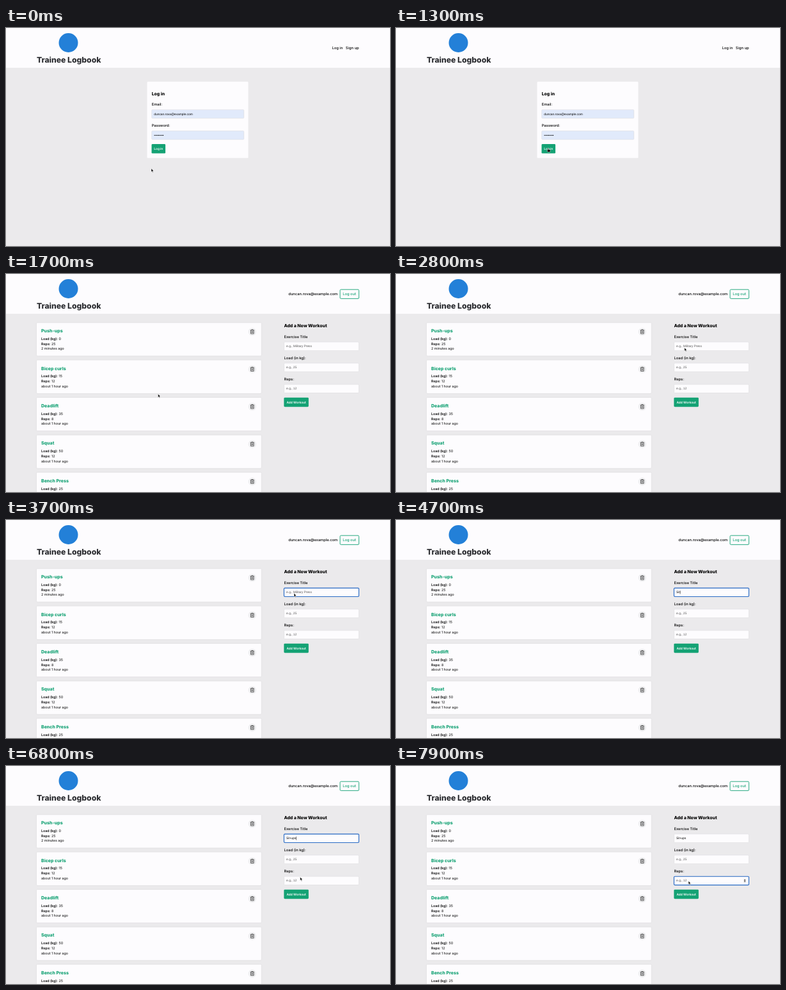
These frames come from a looping animation (600x340 px, 8 s). An HTML page:

```html
<!DOCTYPE html>
<html lang="en">
<head>
<meta charset="utf-8">
<title>Trainee Logbook</title>
<style>
  html, body { margin: 0; width: 100%; height: 100%; overflow: hidden; background: #ebeaec; }
  svg { display: block; width: 600px; height: 340px; }
  text { font-family: Inter, "Open Sans", sans-serif; font-size: 5.76px; font-weight: 500; fill: #000; text-rendering: geometricPrecision; }
  .brand { font-size: 12.2px; font-weight: 800; fill: #2c2d31; }
  .head { font-size: 6.9px; font-weight: 800; }
  .title { font-size: 7px; font-weight: 800; fill: #14a274; }
  .line { font-size: 5.3px; fill: #222; }
  .bold { font-weight: 750; }
  .btn { font-size: 4.8px; font-weight: 600; fill: #fff; }
  .field { font-family: "Liberation Sans", Arial, sans-serif; font-size: 4.85px; }
  .hint { fill: #555; }
  .green { fill: #14a274; }
  .box { fill: #fdfcfe; stroke: #d8d8da; stroke-width: .5; }
  .auto { fill: #e1eafb; }
  .ring { fill: none; stroke: #2a6cc6; stroke-width: 1.15; }
  .card { fill: #fdfcfe; filter: drop-shadow(.7px .7px .9px rgba(0, 0, 0, .07)); }
</style>
</head>
<body>
<svg id="stage" viewBox="0 0 600 340" xmlns="http://www.w3.org/2000/svg"></svg>
<script>
const LOOP = 8000, STEP = 100, BLINK = 500;
const EMAIL = "duncan.rova@example.com";
const stage = document.getElementById("stage");

function add(parent, tag, attrs, content) {
  const el = document.createElementNS("http://www.w3.org/2000/svg", tag);
  for (const key in attrs) el.setAttribute(key, attrs[key]);
  if (content !== undefined) el.textContent = content;
  return parent.appendChild(el);
}
const group = (parent = stage) => add(parent, "g", {});
const rect = (parent, x, y, width, height, attrs) =>
  add(parent, "rect", { x, y, width, height, ...attrs });
const text = (parent, x, y, content, cls = "", attrs = {}) =>
  add(parent, "text", { x, y, class: cls, ...attrs }, content);
const show = (el, on) => el.setAttribute("visibility", on ? "visible" : "hidden");

function button(parent, x, y, width, height, label) {
  rect(parent, x, y, width, height, { rx: 1.4, class: "green" });
  text(parent, x + width / 2, y + height / 2 + 1.7, label, "btn", { "text-anchor": "middle" });
}

function input(parent, x, y, width, label, hint) {
  text(parent, x, y - 6.3, label);
  rect(parent, x, y, width, 13.4, { rx: 1.3, class: "box" });
  return text(parent, x + 3.6, y + 8.2, hint, "field hint");
}

function trash(parent, x, y) {
  add(parent, "circle", { cx: x, cy: y, r: 6.1, fill: "#ededef" });
  add(parent, "path", {
    transform: `translate(${x} ${y})`,
    d: "M-2.9-2.5H2.9M-1-2.6V-3.2H1V-2.6M-2.3-2.4V3H2.3V-2.4M-.8-1.2V1.8M.8-1.2V1.8",
    fill: "none", stroke: "#333", "stroke-width": .75
  });
}

function workoutCard(parent, y, [name, load, reps, age]) {
  rect(parent, 48, y, 350.8, 51.3, { rx: 1.4, class: "card" });
  text(parent, 55, y + 15, name, "title");
  [["Load (kg):", load], ["Reps:", reps]].forEach(([label, value], i) => {
    const row = text(parent, 55, y + 26.8 + i * 7.8, "", "line");
    add(row, "tspan", { class: "bold" }, label);
    add(row, "tspan", {}, " " + value);
  });
  text(parent, 55, y + 42.1, age, "line");
  trash(parent, 384.8, y + 13.9);
}

// Page and header
rect(stage, 0, 0, 600, 340, { fill: "#ebeaec" });
rect(stage, 0, 0, 600, 62, { fill: "#fdfcfe" });
add(stage, "circle", { cx: 97.5, cy: 23, r: 15, fill: "#2380d8" });
text(stage, 48, 53.5, "Trainee Logbook", "brand");

// Login page
const login = group();
text(login, 509.5, 33, "Log in");
text(login, 551.5, 33, "Sign up", "", { "text-anchor": "end" });
rect(login, 220.5, 83.8, 158, 119, { rx: 1.2, fill: "#fdfcfe" });
text(login, 227.7, 105, "Log in", "head");
[["Email:", 127.4, EMAIL], ["Password:", 160.5, "•".repeat(9)]].forEach(([label, y, value]) => {
  const field = input(login, 227.7, y, 144, label, value);
  field.previousSibling.classList.add("auto");
  field.classList.remove("hint");
});
button(login, 227.5, 181.1, 21.6, 14.5, "Log in");

// Signed-in page
const home = group();
text(home, 518.2, 33, EMAIL, "", { "text-anchor": "end" });
rect(home, 522, 24.2, 29.4, 14.2, { rx: 1.4, fill: "#fdfcfe", stroke: "#14a274", "stroke-width": .9 });
text(home, 536.6, 33, "Log out", "green", { "text-anchor": "middle" });
text(home, 434.4, 83.2, "Add a New Workout", "head");
const titleField = input(home, 434.5, 106.1, 116.8, "Exercise Title", "");
input(home, 434.5, 139.1, 116.8, "Load (in kg):", "e.g., 25");
input(home, 434.5, 172.2, 116.8, "Reps:", "e.g., 12");
button(home, 434.3, 192.7, 38.5, 14.5, "Add Workout");

const ring = rect(home, 434.4, 0, 117, 13.4, { rx: 1.4, class: "ring" });
const caret = rect(home, 438, 0, .5, 5.4, { fill: "#000" });
const spinner = group(home);
rect(spinner, 542.9, 175.8, 4.2, 6.2, { rx: .8, fill: "#ececee" });
add(spinner, "path", { d: "M543.7 178.5L545 176.6L546.3 178.5ZM543.7 179.4L545 181.3L546.3 179.4Z", fill: "#333" });

const list = group();
[
  ["Push-ups", 0, 25, "2 minutes ago"],
  ["Bicep curls", 15, 12, "about 1 hour ago"],
  ["Deadlift", 35, 8, "about 1 hour ago"],
  ["Squat", 50, 12, "about 1 hour ago"],
  ["Bench Press", 25, 10, "about 1 hour ago"]
].forEach((workout, i) => workoutCard(list, 76.2 + i * 58.4, workout));

// Pointer
const pointer = group();
const arrow = add(pointer, "path", {
  d: "M0 0V5.2L1.2 4.1L2.1 6.1L3 5.7L2.1 3.8H3.7Z",
  fill: "#000", stroke: "#fff", "stroke-width": .45
});
const hand = add(pointer, "path", {
  d: "M-.6 .5Q0-.3 .6 .5V2.4L3.1 2.9Q3.8 3.1 3.6 4L3 6.3H-.4L-2 3.8Q-1.7 3-.6 3.9Z",
  fill: "#000", stroke: "#fff", "stroke-width": .45
});

// [time, x, y]
const path = [
  [0, 227, 219.2], [600, 237.6, 187.2], [2100, 237.6, 187.2], [2800, 450.8, 114.9],
  [3100, 450, 114.3], [6100, 450, 114.3], [6800, 459.6, 173.3], [7200, 457, 179.4], [LOOP, 457, 179.4]
];
// [time, text]
const typed = [
  [4300, "S"], [4500, "Si"], [4700, "Sit"], [5100, "Sit-"],
  [5300, "Sit-u"], [5500, "Sit-up"], [5700, "Sit-ups"]
];
const FOCUS_TITLE = 3100, FOCUS_REPS = 7400;

function pointerAt(t) {
  const i = path.findIndex(key => key[0] > t);
  const [t0, x0, y0] = path[i - 1], [t1, x1, y1] = path[i];
  const p = (t - t0) / (t1 - t0), e = p * p * (3 - 2 * p);
  return [x0 + (x1 - x0) * e, y0 + (y1 - y0) * e];
}

function draw(t) {
  const signedIn = t >= 1600;
  show(login, !signedIn);
  show(home, signedIn);
  show(list, t >= 1700);

  const [x, y] = pointerAt(t);
  const overButton = t >= 500 && !signedIn;
  pointer.setAttribute("transform", `translate(${x} ${y})`);
  show(arrow, !overButton && (t < 4300 || t >= 6100));
  show(hand, overButton);

  const [lastKey, value] = typed.filter(key => key[0] <= t).pop() || [0, ""];
  titleField.textContent = value || "e.g., Military Press";
  titleField.classList.toggle("hint", !value);

  const onReps = t >= FOCUS_REPS, focused = t >= FOCUS_TITLE;
  const since = t - (onReps ? FOCUS_REPS : Math.max(FOCUS_TITLE, lastKey));
  const top = onReps ? 172.2 : 106.1;
  ring.setAttribute("y", top);
  caret.setAttribute("y", top + 4);
  caret.setAttribute("x", 438.1 + (value && !onReps ? titleField.getComputedTextLength() : 0));
  show(ring, signedIn && focused);
  show(caret, focused && Math.floor(since / BLINK) % 2 === 0);
  show(spinner, t >= 6900);
}

const start = performance.now();
function tick() {
  const t = (performance.now() - start) % LOOP;
  draw(Math.floor(t / STEP) * STEP);
  requestAnimationFrame(tick);
}
tick();
</script>
</body>
</html>
```
